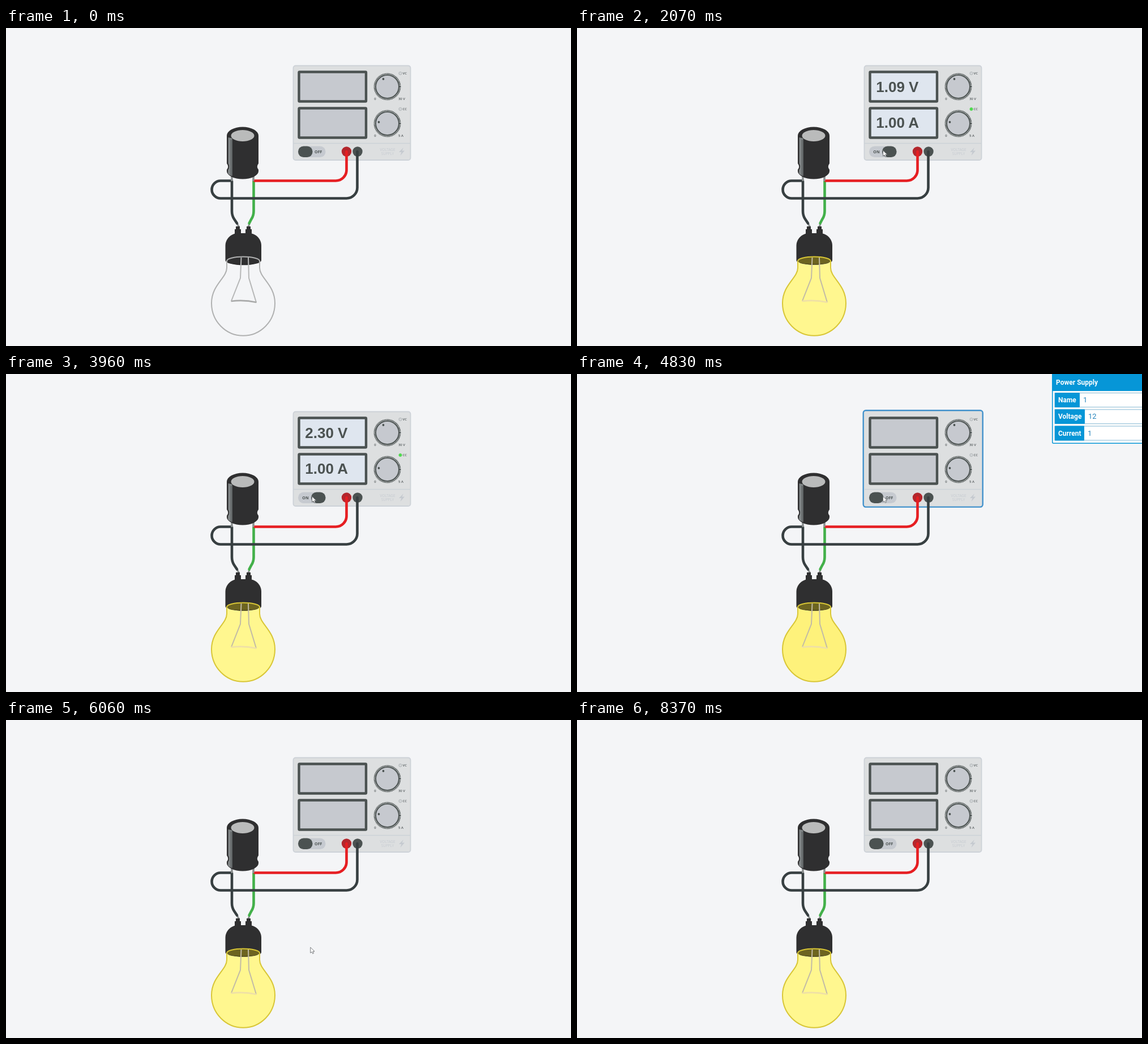
These frames come from a looping animation (998x561 px, 8400 ms). An HTML page:

```html
<!DOCTYPE html>
<html lang="en">
<head>
<meta charset="utf-8">
<title>Capacitor and lamp</title>
<style>
  html, body { margin: 0; width: 100%; height: 100%; overflow: hidden; background: #f4f5f7; }
  svg { display: block; width: 998px; height: 561px; }
  .wire { fill: none; stroke-width: 4.6; stroke-linecap: round; }
  .lead { fill: none; stroke: #8c9090; stroke-width: 3.2; }
  .lcd { stroke: #4b5251; stroke-width: 4.4; }
  .digits { font: bold 26px "Liberation Sans", Arial, sans-serif; fill: #4b5251; }
  .tiny { font: 600 6px "Open Sans", sans-serif; fill: #555b5d; text-anchor: middle; }
  .switch { font: bold 7px "Open Sans", sans-serif; fill: #4b5251; text-anchor: middle; }
  .brand { font: 6.4px "Open Sans", sans-serif; fill: #c5cad0; text-anchor: middle; }
  .label { font: bold 12px Roboto, sans-serif; fill: #fff; }
  .value { font: 13px Roboto, sans-serif; fill: #2685bd; }
</style>
</head>
<body>
<svg viewBox="0 0 998 561">
  <rect width="998" height="561" fill="#f4f5f7"/>

  <g id="supply">
    <rect id="halo" x="505.7" y="64.3" width="211" height="170.3" rx="4.5" fill="#dddfe0" stroke="#4292cc" stroke-width="2.4"/>
    <rect id="case" x="507.5" y="66.5" width="207" height="166.5" rx="4" fill="#dddfe0" stroke="#cdd2d8" stroke-width="1.8"/>
    <path d="M508 203.5H714" stroke="#cbd1d7" stroke-width="1.3"/>
    <rect class="lcd" x="517.5" y="77.5" width="118.5" height="52" rx="1"/>
    <rect class="lcd" x="517.5" y="141.5" width="118.5" height="52" rx="1"/>
    <text class="digits" id="volts" x="528.3" y="113"></text>
    <text class="digits" id="amps" x="528.3" y="176">1.00 A</text>
    <g id="knobs"></g>
    <rect x="516" y="208.5" width="48.5" height="19.5" rx="9.75" fill="#c6cad0"/>
    <rect id="thumb" y="208.5" width="25.5" height="19.5" rx="9.5" fill="#4b5251"/>
    <text class="switch" id="state" y="220.8"></text>
    <text class="brand" x="674" y="217">VOLTAGE</text>
    <text class="brand" x="674" y="224">SUPPLY</text>
    <path d="M702 211L694 219H698.5L696.5 225L704 216.5H699.5Z" fill="#c5cad0"/>
    <circle cx="601.5" cy="218" r="8.7" fill="#b4262c"/>
    <circle cx="621" cy="218" r="8.7" fill="#4b5251"/>
  </g>

  <g id="wires">
    <path class="lead" d="M399 258V272M437 258V272M406 341L411.5 351M431.5 341L428 351"/>
    <path class="wire" stroke="#43b04a" d="M437.5 271V323Q437.5 331 433.5 337L429.5 344.5"/>
    <path class="wire" stroke="#e61e22" d="M601.5 218V250.5A19 19 0 0 1 582.5 269.5H439"/>
    <path class="wire" stroke="#373f41" d="M399 270V323Q399 331 403 337L408 344.5"/>
    <path class="wire" stroke="#373f41" d="M620.5 218V281.5A19 19 0 0 1 601.5 300.5H379A15.5 15.5 0 0 1 379 269.5H398"/>
    <path class="lead" d="M399 260V270M437 260V270"/>
  </g>

  <g id="capacitor">
    <path fill="#2f2f30" d="M390 190A28 15.5 0 0 1 446 190V239Q441.5 245 446 250V252.5A28 14 0 0 1 390 252.5V250Q394.5 245 390 239Z"/>
    <path fill="#7f8485" d="M392.5 193L399.5 194.5V261Q395 260 392 257V250.5Q396 245 392.5 239Z"/>
    <path fill="none" stroke="#4a4d4e" d="M397.5 197V260"/>
    <ellipse cx="418" cy="190" rx="20.5" ry="10" fill="#babbbb"/>
  </g>

  <g id="lamp">
    <g fill="#2f2f30">
      <path d="M406 350H413V355H415V364H404V355H406ZM425 350H432V355H434V364H423V355H425Z"/>
      <path d="M387.5 384C387.5 372 398 362 410 362H429C441 362 451 372 451 384V410A31.75 8.3 0 0 1 387.5 410Z"/>
    </g>
    <path id="glass" class="bulb"/>
    <ellipse cx="419" cy="410.5" rx="29" ry="7" fill="#2f2f30"/>
    <ellipse id="neck" cx="419" cy="410.5" rx="29" ry="7" fill="#6d6420"/>
    <path d="M392 413A27 4.5 0 0 0 446 413A27 3.5 0 0 1 392 413" fill="#222" opacity=".6"/>
    <path id="legs" fill="none" stroke-width="2" d="M415.5 405L414 441L398 481.5M428 405L429 441L442 484"/>
    <path id="filament" fill="none" stroke-width="2.6" d="M397.5 482Q420 479 442.5 484"/>
    <path id="rim" class="bulb" fill="none" stroke-width="2"/>
  </g>

  <g id="panel">
    <rect x="839.75" y="1" width="170" height="121.2" rx="2" fill="#f8fafb" stroke="#0696d7" stroke-width="1.5"/>
    <rect x="839" y="0" width="160" height="30" fill="#0696d7"/>
    <text class="label" x="846" y="19.3">Power Supply</text>
    <g id="rows"></g>
  </g>

  <path id="cursor" d="M0 0V10L2.4 7.9L4 11.3L5.8 10.4L4.2 7.2H7.3Z" fill="#fff" stroke="#6b6f72" stroke-width=".9"/>
</svg>
<script>
const LOOP = 8400, STEP = 30;
const ON = 423, OFF = 4740, SELECT = 4800, DESELECT = 5940;
const $ = id => document.getElementById(id);
const set = (el, attrs) => { for (const k in attrs) el.setAttribute(k, attrs[k]); };
const show = (id, on) => $(id).style.display = on ? '' : 'none';

function knob(y, dotX, dotY, max, name) {
  const x = 673.5, tick = 2 * Math.PI * 21.9 / 60;
  const ledY = y < 150 ? 80 : 143;
  return `<circle cx="${x}" cy="${y}" r="21.9" fill="none" stroke="#4b5251" stroke-width="4"
      stroke-dasharray="${tick * .62} ${tick * .38}"/>
    <circle cx="${x}" cy="${y}" r="20.3" fill="#c6c9cf" stroke="#4b5251" stroke-width="1.6"/>
    <circle cx="${dotX}" cy="${dotY}" r="1.9" fill="#4b5251"/>
    <text class="tiny" x="652" y="${y + 23}">0</text>
    <text class="tiny" x="${max === '5 A' ? 697.5 : 699}" y="${y + 23}">${max}</text>
    <circle id="led${name}" cx="696.5" cy="${ledY}" r="2.6" fill="#d3d6d8" stroke="#a5aaad" stroke-width=".8"/>
    <text class="tiny" x="704.3" y="${ledY + 2}">${name}</text>`;
}
$('knobs').innerHTML = knob(103.5, 666.5, 90, '30 V', 'VC') + knob(168.5, 658.5, 166, '5 A', 'CC');

$('rows').innerHTML = [['Name', '1', 44], ['Voltage', '12', 53], ['Current', '1', 52]].map(([name, value, w], i) => {
  const y = 33 + i * 29.3;
  return `<rect x="844" y="${y + .5}" width="160" height="24.8" fill="#fff" stroke="#8dbdd6"/>
    <rect x="844" y="${y}" width="${w}" height="25.8" rx="1" fill="#0696d7"/>
    <text class="label" x="850" y="${y + 17}">${name}</text>
    <text class="value" x="${850 + w}" y="${y + 17}">${value}</text>`;
}).join('');

const bulb = 'M390 411A29 7.5 0 0 1 448 411V423C448 441 475 453 475 485.5A56 57.3 0 0 1 363 485.5C363 453 390 441 390 423Z';
document.querySelectorAll('.bulb').forEach(el => set(el, { d: bulb }));

// time, x, y of the pointer tip
const path = [
  [30, 70, 400], [330, 541, 217], [510, 541, 217], [840, 533, 230], [1500, 533, 230],
  [1800, 540.5, 216], [5520, 540.5, 216], [5850, 560, 380], [6030, 540, 400],
  [6450, 385, 470], [6900, 381, 446], [7110, 381, 446], [7500, 640, 500], [7860, 944, 420]
];
const glow = [[ON, 0], [1200, .62], [1900, 1], [LOOP, 1]];

function sample(table, t, ease = u => u) {
  let i = 1;
  while (i < table.length - 1 && t > table[i][0]) i++;
  const a = table[i - 1], b = table[i];
  const u = ease(Math.min(1, Math.max(0, (t - a[0]) / (b[0] - a[0]))));
  return a.slice(1).map((v, k) => v + (b[k + 1] - v) * u);
}
const smooth = u => u * u * (3 - 2 * u);

// Charging voltage, rising almost linearly
function reading(t) {
  const s = (t - 1200) / 1000;
  const v = Math.max(0, .515 + .65965 * s - .00468 * s * s);
  return v < .9995 ? Math.round(v * 1000) + ' mV' : v.toFixed(2) + ' V';
}

function draw(t) {
  const on = t >= ON && t < OFF, lit = t >= ON, selected = t >= SELECT && t < DESELECT;
  const [k] = sample(glow, t);

  document.querySelectorAll('.lcd').forEach(el => set(el, { fill: on ? '#dfe6ef' : '#c6c9cf' }));
  show('volts', on);
  show('amps', on);
  $('volts').textContent = on ? reading(t) : '';
  set($('ledCC'), on ? { fill: '#50d94f', stroke: '#50d94f' } : { fill: '#d3d6d8', stroke: '#a5aaad' });
  set($('thumb'), { x: on ? 539 : 516 });
  set($('state'), { x: on ? 529 : 551.7 });
  $('state').textContent = on ? 'ON' : 'OFF';
  show('halo', selected);
  show('case', !selected);
  show('panel', selected);

  set($('glass'), { fill: selected ? '#fef27b' : '#fff78f', 'fill-opacity': k });
  set($('neck'), { 'fill-opacity': k });
  set($('rim'), { stroke: lit ? '#d8c636' : '#b0b1b1' });
  set($('legs'), { stroke: k > .8 ? '#c2bba6' : '#b6b7b7' });
  set($('filament'), { stroke: !lit ? '#a9aaaa' : k > .8 ? '#efe0a6' : '#d4c54a' });

  const [x, y] = sample(path, t, smooth);
  show('cursor', t >= 30 && t < 7890);
  set($('cursor'), { transform: `translate(${x} ${y})` });
}

const start = performance.now();
function tick() {
  const t = (performance.now() - start) % LOOP;
  draw(Math.floor(t / STEP) * STEP);
  requestAnimationFrame(tick);
}
tick();
</script>
</body>
</html>
```
